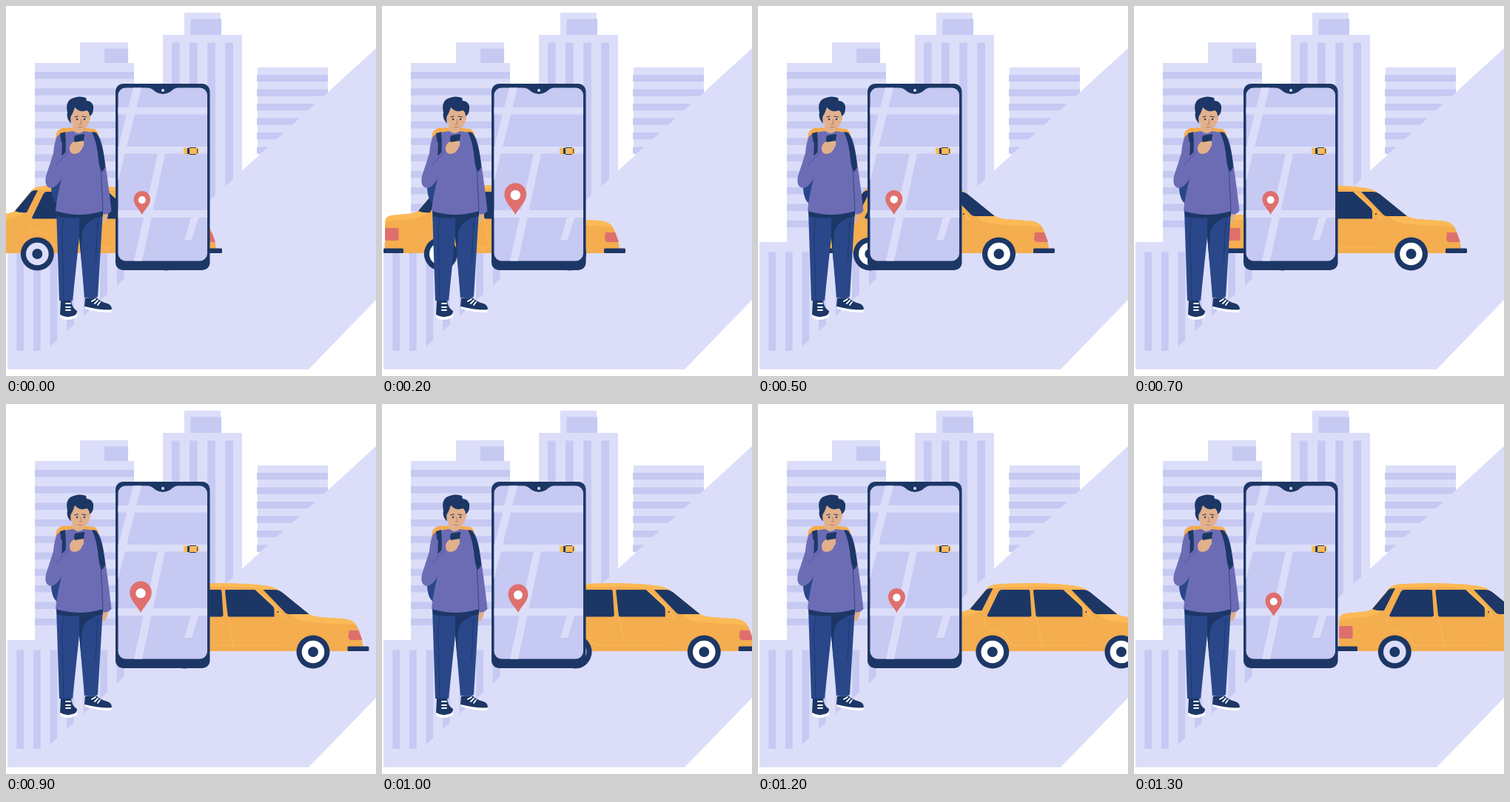
Recreate the animation shown at these times as an HTML page. Size 500 by 500 pixels, loop 1500 ms.

```html
<!DOCTYPE html>
<html lang="en">
<head>
<meta charset="utf-8">
<title>Taxi ride</title>
<style>
html, body { margin: 0; height: 100%; overflow: hidden; background: #fff; }
svg { display: block; width: 100%; height: 100%; }
.light { fill: #dcdef9; }
.mid { fill: #c6c9f2; }
.navy { fill: #1c3766; }
.orange { fill: #f4ad4f; }
.amber { fill: #fcba57; }
.red { fill: #df6f6d; }
.white { fill: #fff; }
.skin { fill: #e2b08b; }
.knit { fill: #6c6cb5; }
.denim { fill: #294789; }
.line { fill: none; stroke-linecap: round; stroke-linejoin: round; }
</style>
</head>
<body>
<svg viewBox="0 0 500 500">
  <defs>
    <g id="wheel">
      <circle class="navy" r="22.5"/>
      <circle class="rim" r="15.3"/>
      <circle class="navy" r="7"/>
    </g>
  </defs>

  <!-- city -->
  <path class="light" d="M39 77H100V49H165V77H173V319H39ZM212 39H241V9H290V39H319V300H212ZM340 83H435V200H340ZM2 319H172V491H2Z"/>
  <path class="mid" d="M133 57.500H165V77H133ZM249.500 17.500H291V39H249.500Z"/>
  <g id="stripes" class="mid"></g>
  <path class="light" d="M500 57V397L409 491H2V466H53Z"/>

  <g id="car">
    <path class="orange" d="M-75 334V295Q-75 284-66 283L-45 281Q-34 280-30 277L-8 250Q-3 243 15 243Q75 241 105 245Q120 246 130 253L169 284Q176 288 190 288.500L218 290.500Q229 292 233 299Q240 310 243 334Z"/>
    <path class="amber" d="M-75 293Q-75 284-66 283L-45 281Q-34 280-30 277L-14 279Q-30 288-50 289Q-66 289-75 293ZM-8 250Q-3 243 15 243Q75 241 105 245Q120 246 128 251H107Q80 246 50 247Q15 247 1 249ZM145 284H169Q176 288 190 288.500L218 290.500Q229 292 233 299Q222 297 200 297Q170 295 158 293Q149 290 145 284Z"/>
    <path class="navy" d="M-30 277L-8 251Q-6 249 1 249L-14 279Q-23 280-30 277ZM13 251H49Q51 251 51 254L53 285Q53 287.500 50 287.500H-5Q-8 287-6 284L8 255Q10 251 13 251ZM57 251H94Q97 251 99 253L120 273Q122 275 122 278V287.500H61Q59 287 59 285L55.500 253Q55.500 251 57 251ZM107 251H123Q128 251 132 254L169 284H142Q138 284 135 280Z"/>
    <path class="line" stroke="#fcba57" stroke-width="1.200" d="M-11 289Q-10 304-2 305Q14 306 19 314Q24 326 30 326H128M60 289L67 326"/>
    <path class="line" stroke="#fcba57" stroke-width="2.500" d="M99 252L122 273L134 288"/>
    <circle class="navy" cx="127" cy="281" r="1.100"/>
    <rect class="red" x="-75" y="300" width="18.500" height="17" rx="2"/>
    <path class="red" d="M223 306H236L241 319H226Q223 319 222 315Z"/>
    <rect class="navy" x="-77" y="327.500" width="27" height="6.500" rx="1.500"/>
    <rect class="navy" x="221" y="327.500" width="29" height="6.500" rx="1.500"/>
    <use href="#wheel" x=".3" y="335"/>
    <use href="#wheel" x="174.500" y="335"/>
  </g>

  <!-- phone -->
  <rect class="navy" x="148" y="105" width="127.500" height="252" rx="10"/>
  <rect class="mid" x="151.500" y="110.500" width="120.500" height="234" rx="10"/>
  <path class="light" d="M151.500 137H272V146.500H151.500ZM151.500 190H272V199.500H151.500ZM151.500 276H272V286H151.500ZM172 110.500H183L151.500 236V192ZM205 199H215L184 344.500H173ZM250 286H260L251 316H241Z"/>
  <path class="navy" d="M191 110H233Q227 111 222 116Q217 119 212 119T202 116Q197 111 191 110Z"/>
  <circle class="light" cx="212" cy="114" r="2"/>
  <rect class="amber" x="240" y="191.500" width="20.500" height="9" rx="2"/>
  <path class="navy" d="M245 192H248V200H245ZM258 193H259V199H258ZM248 191H257V192H248ZM248 200H257V201H248Z"/>
  <g id="pin">
    <path class="red" d="M0 0C-4-8-11.500-13-11.500-21.500A11.500 11.500 0 0 1 11.500-21.500C11.500-13 4-8 0 0Z"/>
    <circle class="white" cy="-20.500" r="5.200"/>
  </g>

  <!-- passenger -->
  <path class="orange" d="M67 180Q67 167 76 165Q98 163 119 166Q125 168 126 180Z"/>
  <path class="denim" d="M64 205L61 243Q61 262 70 268L82 228Z"/>
  <path class="skin" d="M130 280H138Q138 289 132 294Q128 293 130 280ZM90 160H105V175H90Z"/>
  <path class="denim" d="M68 276H131L124 393Q116 396 106 394L99 312L90 398Q81 400 72 398Z"/>
  <path class="navy" d="M68 274H131V284Q109 289 104 302Q101 311 102 345L99 312L99 286Q80 288 69 284Z"/>
  <path class="line" stroke="#1c3766" stroke-width=".8" d="M78 288Q75 298 76 320L78 396M124 290L121 345"/>
  <path class="knit" d="M68 181Q69 173 78 171L91 169Q98 175 105 169L119 171Q127 173 130 188Q136 220 142.500 277Q137 283 131 281V277Q100 287 67 277Q69 255 77 226Z"/>
  <path class="line" stroke="#1c3766" stroke-width=".7" d="M128 215L131 277"/>
  <path class="navy" d="M73 172L80 170Q82 190 79 215L74 226Q77 196 73 172ZM116 170L122 171Q132 187 134 218L130 224Q126 220 125 208Q123 184 116 170Z"/>
  <path class="knit" d="M69 176Q65 185 64 199L54 230Q51 246 62 246Q69 244 76 232L103 203L88 190L75 203L76 185Z"/>
  <path class="line" stroke="#4f509d" stroke-width=".8" d="M88 193L68 215"/>
  <path class="skin" d="M86 193Q86 186 92 183L104 181Q107 187 103 192Q101 199 92 200Q86 199 86 193Z"/>
  <path class="navy" d="M93 175L105 173Q107 173 106 175L105 182L93 184Q91 180 93 175Z"/>
  <path class="skin" d="M89 138L88 147Q84 148 86 155L89 158Q91 167 99 168Q110 167 113 155Q116 149 112 138Z"/>
  <path class="navy" d="M88 159Q81 152 83 144Q80 131 87 126Q98 120 108 124L109 128Q119 129 118 139Q118 146 113 149Q113 143 109 141Q100 145 93 137Q91 143 89 147Q86 149 88 159Z"/>
  <path class="line" stroke="#1c3766" stroke-width="1.200" d="M93 150L97 149M103 149L108 150"/>
  <circle class="navy" cx="96" cy="153" r="1.200"/>
  <circle class="navy" cx="106" cy="153" r="1.200"/>
  <path class="line" stroke="#b87862" stroke-width=".9" d="M101 153L102 159L99 159.500M97 163.500Q101 165 104 163"/>
  <path class="white" d="M73 414H96V420Q91 424 83 424Q75 424 73 419ZM106 404L143 408Q144 412 141 414Q126 415 107 409Z"/>
  <path class="navy" d="M74 398H88Q89 408 96 412Q96 418 90 419Q81 422 73 417ZM107 395L122 394Q128 400 137 402Q143 404 143 410Q132 412 106 406Z"/>
  <path class="line" stroke="#fff" stroke-width="1.800" d="M81 402H87M81 407H87M81 411H87M116 399L121 396M120 402L124 398M124 404L127 400"/>
</svg>
<script>
const $ = id => document.getElementById(id);

const bars = (n, x, y, w, h, dx, dy) => {
  let d = '';
  for (let i = 0; i < n; i++) d += `M${x + i * dx} ${y + i * dy}h${w}v${h}h${-w}Z`;
  return `<path d="${d}"/>`;
};
$('stripes').innerHTML =
  bars(10, 39, 89, 134, 9.5, 0, 22.3) +
  bars(4, 224, 49.5, 10.7, 250, 24.1, 0) +
  bars(6, 339, 93, 96, 9.3, 0, 19.5) +
  bars(7, 14.3, 332.5, 9.8, 134, 22.6, 0);

// Linear interpolation through [position, value] points.
const along = (points, p) => {
  const i = Math.max(1, points.findIndex(([q]) => q >= p));
  const [[p0, v0], [p1, v1]] = [points[i - 1], points[i]];
  return v0 + (v1 - v0) * (p - p0) / (p1 - p0);
};

const drive = [[0, 42], [200, 79], [500, 151], [700, 200], [1100, 281], [1300, 352]];
const pulse = [[0, 0.97], [0.15, 1.37], [0.5, 1.04], [0.7, 1], [1, 0.97]];
const beat = 160; // distance driven per pulse of the pin
const rims = document.querySelectorAll('.rim');

function draw(now) {
  // The picture advances every 100 ms and rests on the last step.
  const t = Math.min(1300, Math.floor(now % 1500 / 100) * 100);
  const carX = along(drive, t);
  const size = along(pulse, (carX - drive[0][1]) / beat % 1);
  const pinX = 183.5 + 5 * (t / 1300) ** 3 - 11 * (size - 1);
  const pinY = 282 + Math.max(0, t - 1200) / 20;
  const rimColor = t % 1300 ? '#fff' : '#dcdef9';

  $('car').setAttribute('transform', `translate(${carX} 0)`);
  $('pin').setAttribute('transform', `translate(${pinX} ${pinY}) scale(${size})`);
  for (const rim of rims) rim.setAttribute('fill', rimColor);
}

const start = performance.now();
function tick() {
  draw(performance.now() - start);
  requestAnimationFrame(tick);
}
tick();
</script>
</body>
</html>
```
